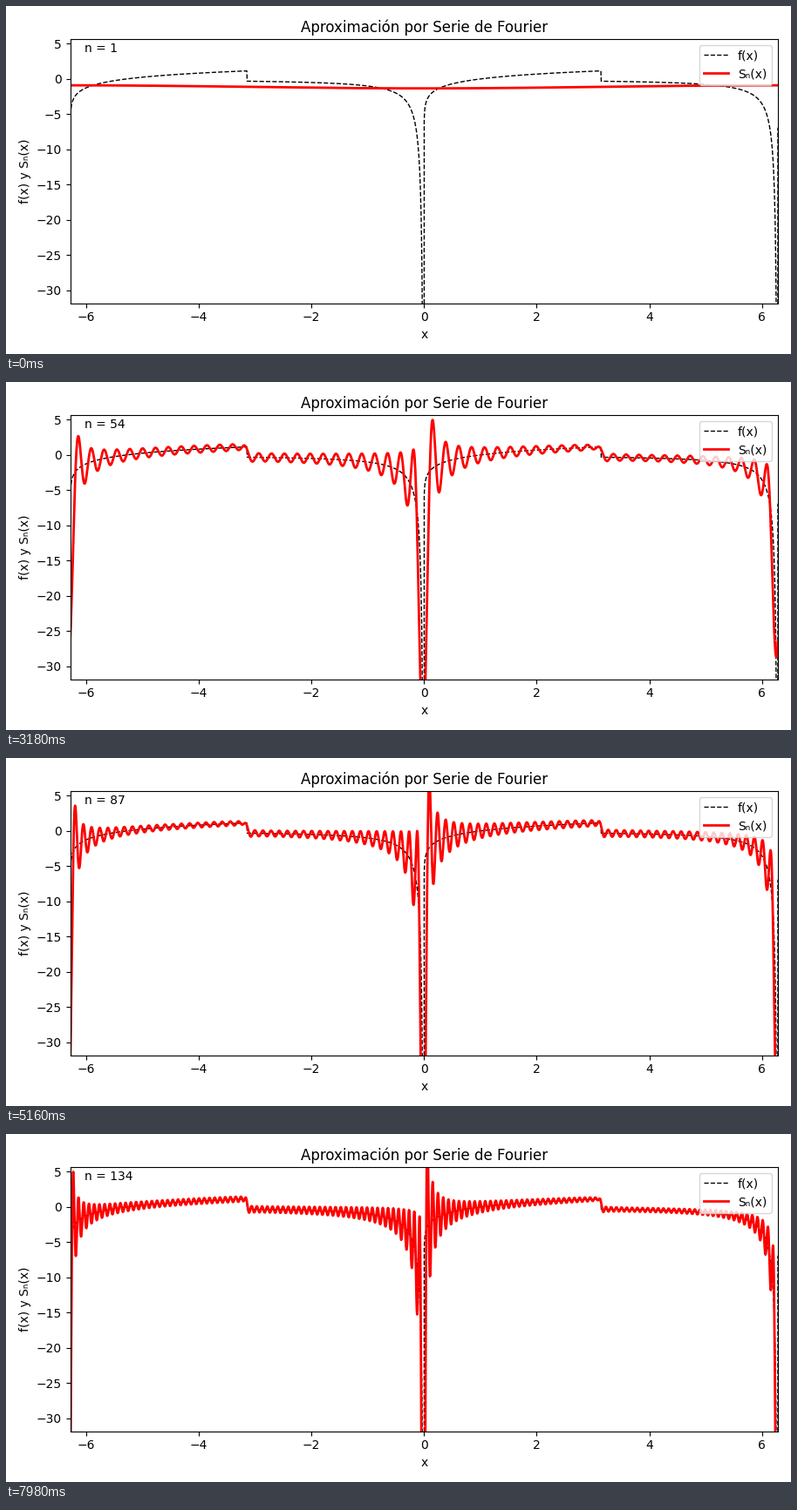
Write a matplotlib script that moves like this. It is 900 px wide and 400 px high and loops after 8 s.

```python
import numpy as np
import matplotlib.pyplot as plt
from matplotlib.animation import FuncAnimation

L = 2 * np.pi          # half of the interval on which the series is built
POINTS = 2000
TERMS = 134
TICK = 20              # ms per drawn frame
TICKS_PER_TERM = 3
FRAMES = 400


def f(x):
    """1/x on (-pi, 0) and ln x on (0, pi), repeated every 2 pi."""
    t = np.mod(x + np.pi, 2 * np.pi) - np.pi
    t = np.where(np.abs(t) < 1e-9, 1e-3, t)
    return np.where(t < 0, 1 / t, np.log(np.abs(t)))


def partial_sums(x, y, terms):
    """Row n holds the partial sum of order n, coefficients by trapezoids."""
    w = np.full(x.size, x[1] - x[0])
    w[[0, -1]] /= 2
    wy = w * y / L
    sums = [np.full(x.size, wy.sum() / 2)]
    for n in range(1, terms + 1):
        c, s = np.cos(n * np.pi * x / L), np.sin(n * np.pi * x / L)
        sums.append(sums[-1] + (wy @ c) * c + (wy @ s) * s)
    return sums


x = np.linspace(-L, L, POINTS)
y = f(x)
sums = partial_sums(x, y, TERMS)

plt.rcParams["font.family"] = "DejaVu Sans"
fig, ax = plt.subplots(figsize=(9, 4), dpi=100)
ax.plot(x, y, "k--", lw=1, label="f(x)")
curve, = ax.plot(x, sums[1], "r", lw=2, label="Sₙ(x)")
counter = ax.text(0.02, 0.95, "n = 1", transform=ax.transAxes)
ax.set_xlim(-L, L)
ax.set_ylim(-31.83, 5.68)
ax.set_title("Aproximación por Serie de Fourier")
ax.set_xlabel("x")
ax.set_ylabel("f(x) y Sₙ(x)")
ax.legend(loc="upper right")
fig.tight_layout()


def update(i):
    n = 1 + i // TICKS_PER_TERM
    curve.set_ydata(sums[n])
    counter.set_text(f"n = {n}")
    return curve, counter


anim = FuncAnimation(fig, update, frames=FRAMES, interval=TICK,
                     repeat=True, repeat_delay=0)
plt.show()
```
